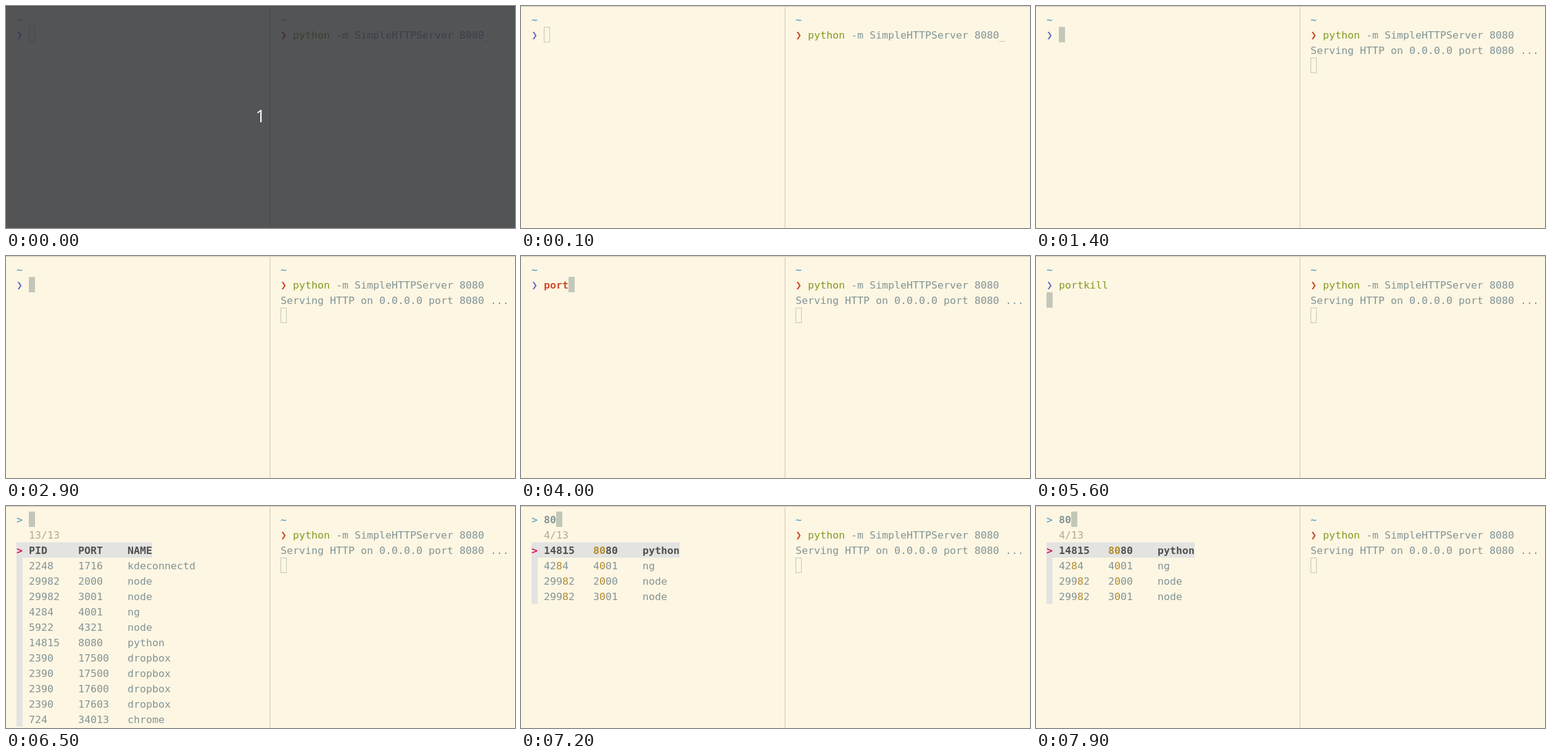
An HTML page for the animation above (8000 ms loop, 825 by 361 pixels).

```html
<!DOCTYPE html>
<html lang="en">
<head>
<meta charset="utf-8">
<title>Terminal demo</title>
<style>
  html, body { margin: 0; width: 100%; height: 100%; overflow: hidden; }
  svg {
    --bg: #fdf6e3; --fg: #839496; --blue: #3a91c6; --violet: #6c71c4;
    --red: #cb4b2d; --green: #859920; --cursor: #c2c7b9;
    --line: #e3dcca; --edge: #d3cdbe;
    display: block; width: 825px; height: 361px; background: var(--bg);
  }
  svg.dim {
    --bg: #535456; --fg: #3c3e4b; --blue: #393b52; --violet: #393a54;
    --red: #4b2c34; --green: #3c402f; --cursor: #464848;
    --line: #4c4d4f; --edge: #48494b;
  }
  text { font: 16.61px "DejaVu Sans Mono", monospace; white-space: pre; fill: var(--fg); }
  .bold { font-weight: bold; }
  .blue { fill: var(--blue); }
  .violet { fill: var(--violet); }
  .red { fill: var(--red); }
  .green { fill: var(--green); }
  .prompt { fill: #70a9c3; }
  .info { fill: #b3ab8a; }
  .pointer { fill: #d7135f; }
  .chosen { fill: #505050; }
  .hit { fill: #b58a2a; }
  .shade { fill: #e3e3e1; }
  .block, .under { fill: var(--cursor); }
  .hollow { fill: none; stroke: var(--cursor); }
  .line { fill: var(--line); }
  .edge { fill: var(--edge); }
  .count { font: 28px "Open Sans", "Noto Sans", sans-serif; fill: #fff; text-anchor: middle; }
  .count, .soft { visibility: hidden; }
  .dim .count, svg:not(.dim) .soft { visibility: visible; }
  .soft { fill: #f1ead8; }
</style>
</head>
<body>
<svg id="stage" viewBox="0 0 825 361">
  <rect class="line" x="427" width="2" height="361"/>
  <rect class="soft" y="1" width="825" height="1"/>
  <rect class="edge" width="825" height="1"/>
  <g id="left" transform="translate(17 9)"></g>
  <g id="right" transform="translate(445 9)"></g>
  <text class="count" x="412.5" y="189">1</text>
</svg>
<script>
const LOOP = 8000, COL = 10, ROW = 25;
const COMMAND = 'portkill';
const KEYS = [3500, 3650, 3800, 3950, 4250, 4400, 4550, 4700];
const AT = { bright: 100, run: 400, serve: 600, focus: 1400, enter: 5500, list: 6000, eight: 6850, zero: 7050 };

const ALL = [
  ['PID', 'PORT', 'NAME'],
  ['2248', '1716', 'kdeconnectd'],
  ['29982', '2000', 'node'],
  ['29982', '3001', 'node'],
  ['4284', '4001', 'ng'],
  ['5922', '4321', 'node'],
  ['14815', '8080', 'python'],
  ['2390', '17500', 'dropbox'],
  ['2390', '17500', 'dropbox'],
  ['2390', '17600', 'dropbox'],
  ['2390', '17603', 'dropbox'],
  ['724', '34013', 'chrome']
];
// Brackets mark the matched characters.
const EIGHT = [
  ['14815', '[8]080', 'python'],
  ['42[8]4', '4001', 'ng'],
  ['299[8]2', '2000', 'node'],
  ['299[8]2', '3001', 'node'],
  ['224[8]', '1716', 'kdeconnectd']
];
const EIGHTY = [
  ['14815', '[80]80', 'python'],
  ['42[8]4', '4[0]01', 'ng'],
  ['299[8]2', '2[0]00', 'node'],
  ['299[8]2', '3[0]01', 'node']
];

const write = (col, row, str, cls = '') => {
  const marked = str.replace(/\[(\d+)\]/g, '<tspan class="hit">$1</tspan>');
  return `<text class="${cls}" x="${col * COL}" y="${row * ROW + 19}">${marked}</text>`;
};
const fill = (col, row, cols, rows, cls) =>
  `<rect class="${cls}" x="${col * COL}" y="${row * ROW}" width="${cols * COL}" height="${rows * ROW}"/>`;
const block = (col, row) => fill(col, row, 1, 1, 'block');
const hollow = (col, row) =>
  `<rect class="hollow" x="${col * COL + .5}" y="${row * ROW + .5}" width="${COL - 1}" height="${ROW - 1}"/>`;
const under = (col, row) =>
  `<rect class="under" x="${col * COL}" y="${row * ROW + 23}" width="${COL}" height="1"/>`;
const shellTop = color => write(0, 0, '~', 'blue') + write(0, 1, '❯', color);

function finder(query, rows) {
  const head = rows[0].join('').replace(/[\[\]]/g, '');
  const name = rows[0][2];
  let out = write(0, 0, '>', 'prompt bold') + write(2, 0, query, 'bold') + block(2 + query.length, 0);
  out += write(2, 1, `${query ? rows.length : 13}/13`, 'info');
  out += fill(0, 2, 1, rows.length, 'shade');
  if (head) out += fill(0, 2, 18 + name.length, 1, 'shade');
  out += write(0, 2, '>', 'pointer bold');
  rows.forEach((cells, i) => cells.forEach((cell, j) => {
    out += write(2 + j * 8, 2 + i, cell, i ? '' : 'chosen bold');
  }));
  return out;
}

function leftPane(t) {
  if (t >= AT.zero) return finder('80', EIGHTY);
  if (t >= AT.eight) return finder('8', EIGHT);
  if (t >= AT.list) return finder('', ALL);
  const typed = KEYS.filter(k => t >= k).length;
  const color = typed === COMMAND.length ? 'green' : 'red bold';
  const cursor = t < AT.focus ? hollow(2, 1) : t < AT.enter ? block(2 + typed, 1) : block(0, 2);
  return shellTop('violet') + write(2, 1, COMMAND.slice(0, typed), color) + cursor;
}

function rightPane(t) {
  let out = shellTop('red') + write(2, 1, 'python', 'green') + write(9, 1, '-m SimpleHTTPServer 8080');
  if (t < AT.run) return out + under(33, 1);
  if (t < AT.serve) return out + block(0, 2);
  out += write(0, 2, 'Serving HTTP on 0.0.0.0 port 8080 ...');
  return out + (t < AT.focus ? block(0, 3) : hollow(0, 3));
}

const stage = document.getElementById('stage');
const panes = [['left', leftPane], ['right', rightPane]].map(([id, draw]) =>
  ({ node: document.getElementById(id), draw, last: '' }));

const start = performance.now();
function tick() {
  const t = (performance.now() - start) % LOOP;
  stage.classList.toggle('dim', t < AT.bright);
  for (const pane of panes) {
    const markup = pane.draw(t);
    if (markup !== pane.last) pane.node.innerHTML = pane.last = markup;
  }
  requestAnimationFrame(tick);
}
tick();
</script>
</body>
</html>
```
